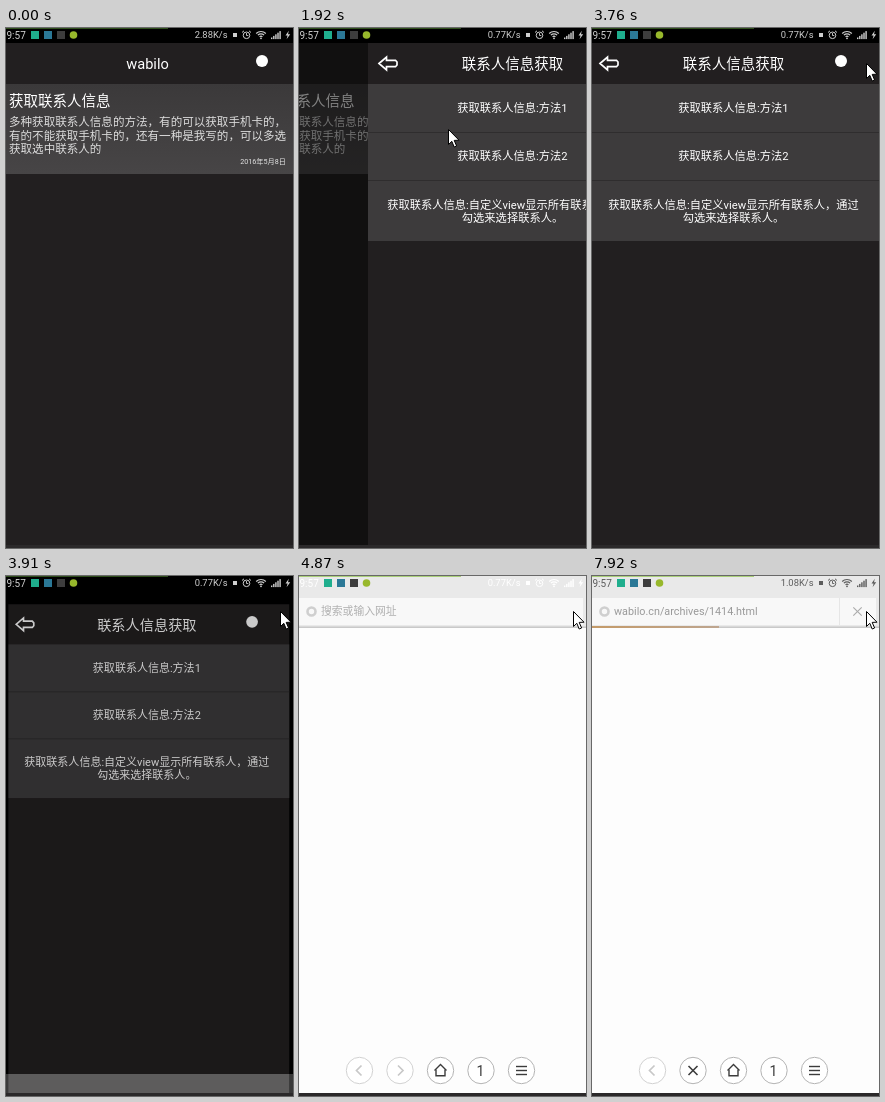
An HTML page with a canvas for the animation above (8000 ms loop, 287 px wide and 520 px high).

```html
<!DOCTYPE html>
<html lang="zh">
<head>
<meta charset="utf-8">
<style>
  html, body { margin: 0; width: 100%; height: 100%; overflow: hidden; background: #000; }
  canvas { display: block; width: 287px; height: 520px; }
</style>
</head>
<body>
<canvas id="stage" width="287" height="520"></canvas>
<script>
const W = 287, H = 520, LOOP = 8000;
const ctx = document.getElementById('stage').getContext('2d');
const FONT = 'Roboto, "Noto Sans CJK SC", "Noto Sans CJK", sans-serif';

function rect(x, y, w, h, color) {
  ctx.fillStyle = color;
  ctx.fillRect(x, y, w, h);
}

function text(str, x, y, size, color, align = 'left') {
  ctx.font = `${size}px ${FONT}`;
  ctx.textAlign = align;
  ctx.textBaseline = 'alphabetic';
  ctx.fillStyle = color;
  ctx.fillText(str, x, y + size * 0.37);
}

function path(points, stroke, width = 1, fill, close = false) {
  ctx.beginPath();
  points.forEach(([x, y]) => ctx.lineTo(x, y));
  if (close) ctx.closePath();
  paint(stroke, width, fill);
}

function arc(x, y, r, stroke, width = 1, fill, from = 0, to = Math.PI * 2) {
  ctx.beginPath();
  ctx.arc(x, y, r, from, to);
  paint(stroke, width, fill);
}

function paint(stroke, width, fill) {
  if (fill) { ctx.fillStyle = fill; ctx.fill(); }
  if (stroke) { ctx.strokeStyle = stroke; ctx.lineWidth = width; ctx.stroke(); }
}

function cross(x, y, r, color, width) {
  path([[x - r, y - r], [x + r, y + r]], color, width);
  path([[x + r, y - r], [x - r, y + r]], color, width);
}

// Index of the current held pose: -1 before start, count - 1 from end on.
function step(t, start, end, count) {
  if (t < start) return -1;
  return Math.min(count - 1, Math.floor((t - start) / (end - start) * (count - 1) + 1e-6));
}

function listPage() {
  rect(0, 15, W, 502, '#221f20');
  text('wabilo', 141.5, 36, 14.6, '#fff', 'center');
  arc(256, 33, 6, null, 0, '#fff');
  const shade = ctx.createLinearGradient(0, 56, 0, 146);
  shade.addColorStop(0, '#3b393a');
  shade.addColorStop(1, '#474546');
  rect(0, 56, W, 90, shade);
  text('获取联系人信息', 3, 73, 14.5, '#fff');
  ['多种获取联系人信息的方法，有的可以获取手机卡的，',
   '有的不能获取手机卡的，还有一种是我写的，可以多选',
   '获取选中联系人的'].forEach((line, i) => text(line, 3, 94 + i * 13.4, 11.55, '#dcdcdc'));
  text('2016年5月8日', 280, 133.5, 7.2, '#e4e4e4', 'right');
}

function detailPage() {
  rect(-3, 15, W + 3, 502, '#221f20');
  path([[8, 35.5], [15.5, 29], [15.5, 32.3], [24.5, 32.3], [26, 34], [26, 37], [24.5, 38.7],
        [15.5, 38.7], [15.5, 42]], '#fff', 1.7, null, true);
  text('联系人信息获取', 141.5, 36, 14.5, '#fff', 'center');
  arc(249, 33, 6, null, 0, '#fff');
  rect(-3, 56, W + 3, 157, '#3d3b3c');
  rect(-3, 104, W + 3, 1, '#2f2d2e');
  rect(-3, 152, W + 3, 1, '#2f2d2e');
  [['获取联系人信息:方法1', 80], ['获取联系人信息:方法2', 128],
   ['获取联系人信息:自定义view显示所有联系人，通过', 176.5], ['勾选来选择联系人。', 189.5]]
    .forEach(([line, y]) => text(line, 141.5, y, 11.25, '#fff', 'center'));
}

function slideIn(t) {
  const now = 1770 + 150 * step(t, 1770, 2220, 4);
  const u = t < 1770 ? 0 : Math.min(1, (now - 1700) / 440);
  const p = 1 - (1 - u) ** 2;
  if (p < 1) {
    ctx.save();
    ctx.translate(Math.round(-65 * p), 0);
    listPage();
    ctx.restore();
    rect(0, 15, W, 502, `rgba(0,0,0,${0.66 * p})`);
  }
  if (p > 0) {
    ctx.save();
    ctx.translate(Math.round(W * (1 - p)), 0);
    detailPage();
    ctx.restore();
  }
}

// The page sinks back while a pale sheet rises over it.
function sheetOver(i) {
  const q = i / 3, scale = 1 - 0.0635 * q, left = 7 * q;
  rect(0, 0, W, 517, '#000');
  ctx.save();
  ctx.translate(left, 40.7 * q);
  ctx.scale(scale, scale);
  detailPage();
  ctx.restore();
  rect(0, 15, left, 502, '#000');
  rect(0, 15, W, 502, `rgba(0,0,0,${Math.min(0.9, 0.62 * q)})`);
  if (!i) return;
  const top = i < 6 ? Math.ceil(H * (1 - (i / 6) ** 1.75)) : 0;
  rect(0, top, W, 517 - top, `rgba(255,255,255,${Math.min(1, 0.15 + 0.14 * i)})`);
  if (i < 6) {
    const right = Math.round(left + W * scale);
    rect(0, top, left, 517 - top, 'rgba(0,0,0,.2)');
    rect(right, top, W - right, 517 - top, 'rgba(0,0,0,.23)');
  }
}

function loadLength(t) {
  const k = step(t, 6840, 7770, 8);
  if (t >= 7920) return 127;
  if (k >= 0) return 12 + 13.9 * (k + 1);
  return 3 * Math.max(0, step(t, 4870, 5840, 8) - 3);
}

function browser(t) {
  const loading = step(t, 4870, 5840, 8) >= 3;
  rect(0, 0, W, 517, '#fdfdfd');
  rect(0, 0, W, 50, '#e9e9e9');
  rect(0, 22, 284, 27, '#f8f8f8');
  rect(0, 50, W, 1, '#d8d8d8');
  rect(0, 51, W, 1, '#c9c9c9');
  arc(12.5, 35.5, 4, '#cfcfcf', 2.6);
  if (loading) {
    text('wabilo.cn/archives/1414.html', 22, 35.5, 10.8, '#999');
    rect(247, 22, 1, 27, '#e6e6e6');
    cross(265.5, 35.5, 4.2, '#aaa', 1.1);
    const bar = ctx.createLinearGradient(0, 0, 127, 0);
    bar.addColorStop(0, '#c49a68');
    bar.addColorStop(1, '#bda58f');
    rect(0, 50, loadLength(t), 2, bar);
  } else {
    text('搜索或输入网址', 22, 35.5, 10.8, '#b0b0b0');
  }

  const y = 494.5, dark = '#3c3c3c', pale = '#c8c8c8';
  [60.5, 101, 141.5, 182, 222.5].forEach((x, i) =>
    arc(x, y, 13.2, i === 0 || (i === 1 && !loading) ? '#d2d2d2' : '#b4b4b4', 1, '#fff'));
  path([[62.5, y - 5], [57.5, y], [62.5, y + 5]], pale, 1.7);
  if (loading) cross(101, y, 4.5, dark, 1.6);
  else path([[99, y - 5], [104, y], [99, y + 5]], pale, 1.7);
  path([[135.5, y], [141.5, y - 6], [147.5, y]], dark, 1.4);
  path([[137, y - 1], [137, y + 5.2], [146, y + 5.2], [146, y - 1]], dark, 1.4);
  text('1', 181.5, y, 14, dark, 'center');
  [-4, 0, 4].forEach(dy => rect(217, y + dy - 0.7, 11, 1.4, dark));
}

function statusBar(t, ink) {
  rect(0, 0, 162, 1, t < 4590 ? '#2f4f1c' : '#a9cf78');
  text('9:57', 0.5, 7, 10, ink);
  rect(25, 3, 8, 8, '#1fae8d');
  rect(38, 3, 8, 8, '#2b7896');
  rect(51, 3, 8, 8, '#3d3d3d');
  arc(67.5, 7, 3.8, null, 0, '#98b82c');
  const speed = t < 540 ? '2.88K/s' : t < 5430 ? '0.77K/s' : '1.08K/s';
  text(speed, 221.5, 7, 9.4, ink, 'right');
  rect(227, 5, 4, 4, ink);
  arc(240.5, 7.3, 3.3, ink);
  path([[240.5, 5], [240.5, 7.5], [242.3, 7.5]], ink, 0.9);
  path([[236, 4.5], [238, 2.8]], ink);
  path([[245, 4.5], [243, 2.8]], ink);
  [2, 4.4, 6.8].forEach(r => arc(255, 10.3, r, ink, 1.2, null, Math.PI * 1.25, Math.PI * 1.75));
  arc(255, 10.3, 0.9, null, 0, ink);
  for (let i = 0; i < 5; i++) rect(265 + i * 2.1, 9.5 - i * 1.6, 1.4, 1.6 + i * 1.6, ink);
  path([[282.8, 2.8], [279.5, 7.6], [281.6, 7.6], [280.6, 11.2], [284.2, 6.2], [282, 6.2]],
       null, 0, ink, true);
}

function cursorAt(t) {
  const enter = step(t, 250, 970, 6), move = step(t, 2900, 3200, 3);
  if (enter < 0) return null;
  const u = enter / 5, m = (move + 1) / 3;
  const curve = (a, b, c) => a * (1 - u) ** 2 + 2 * b * u * (1 - u) + c * u * u;
  return [curve(222, 86, 149) + 125 * m, curve(317, 190, 101) - 66 * m];
}

function cursor(t) {
  const at = cursorAt(t);
  if (!at) return;
  ctx.save();
  ctx.translate(at[0], at[1]);
  path([[0.5, 0.5], [0.5, 15.5], [3.8, 12.3], [6.2, 18], [8.6, 17], [6.2, 11.4], [11, 11.2]],
       '#000', 1, '#fff', true);
  ctx.restore();
}

function draw(t) {
  rect(0, 0, W, H, '#000');
  let ink = '#cfcfcf';
  if (t < 3760) {
    slideIn(t);
  } else if (t < 4870) {
    const i = step(t, 3760, 4210, 4) + Math.max(0, step(t, 4210, 4720, 5));
    sheetOver(i);
    if (i >= 6) ink = '#fff';
    else rect(0, 0, W, 15, '#000');
  } else {
    browser(t);
    ink = t < 5009 ? '#fff' : '#5c5c5c';
  }
  statusBar(t, ink);
  rect(0, 517, W, 3, '#2b292a');
  cursor(t);
}

function tick() {
  draw(performance.now() % LOOP);
  requestAnimationFrame(tick);
}
tick();
</script>
</body>
</html>
```
